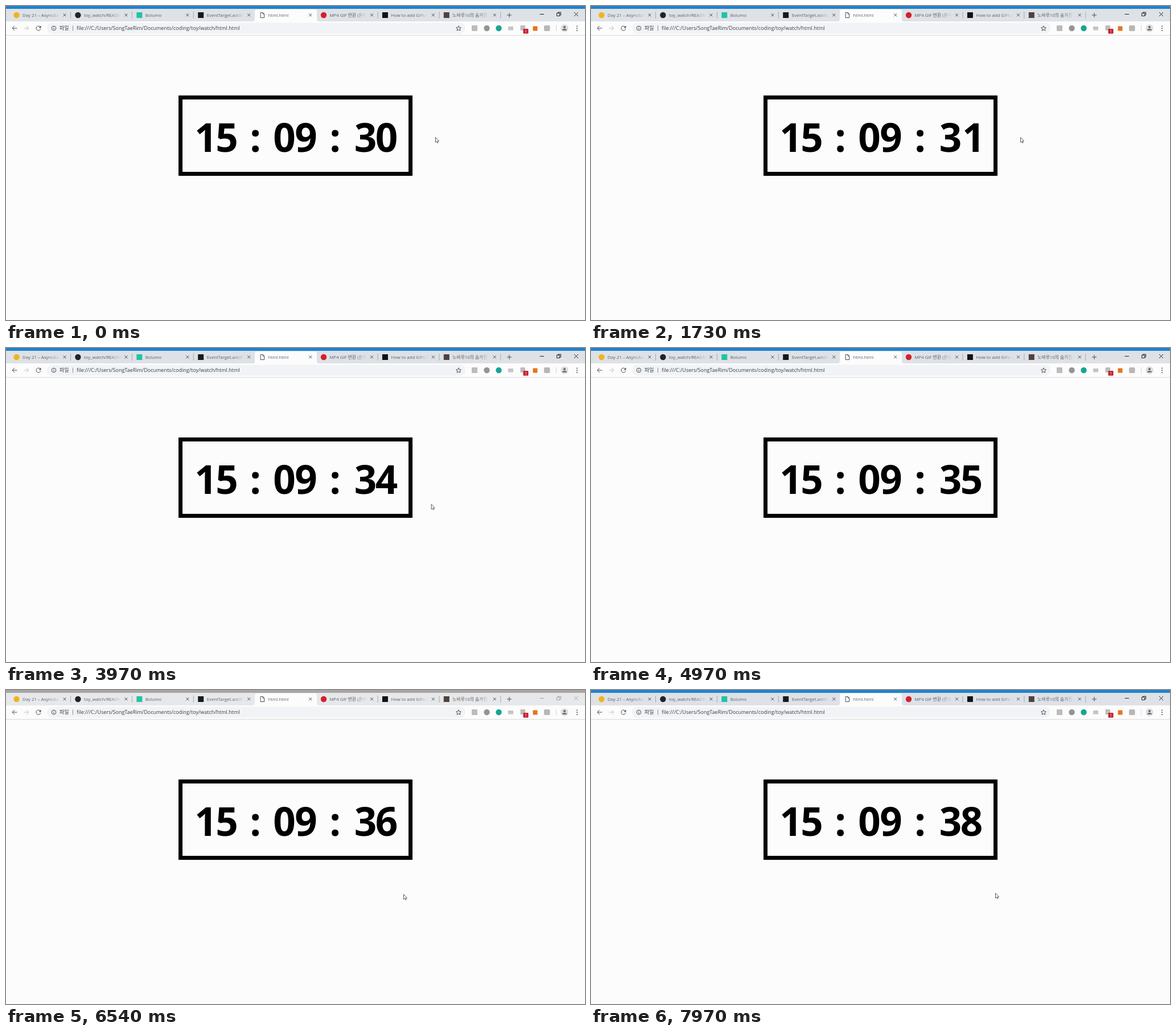
Write an HTML page that moves like this. It is 1017 by 551 pixels and loops after 8 s.

```html
<!DOCTYPE html>
<html lang="ko">
<head>
<meta charset="utf-8">
<title>html.html</title>
<style>
html, body { margin: 0; width: 100%; height: 100%; overflow: hidden; background: #fcfcfc; }
svg { display: block; width: 1017px; height: 551px; }
text { font-family: 'Open Sans', 'Noto Sans CJK KR', 'Noto Sans CJK', 'Noto Sans', sans-serif; white-space: pre; }
.tab text { font-size: 7.8px; }
.url text { font-size: 9px; fill: #3c4043; }
.clock text { font-size: 69px; font-weight: 700; text-anchor: middle; }
.line { fill: none; stroke: #4a4d51; stroke-width: 1; }
.edge, .strip, .buttons { animation: 8s step-end infinite; }
.edge { fill: #2182cb; animation-name: edge; }
.strip { fill: #dee1e6; animation-name: strip; }
.buttons { fill: none; stroke: #222; animation-name: buttons; }
.pointer { animation: move 8s linear infinite; }

/* the window loses focus, then gets it back */
@keyframes edge { 65% { fill: #a9a5a5; } 96.25% { fill: #2182cb; } }
@keyframes strip { 65% { fill: #e7e8ea; } 96.25% { fill: #dee1e6; } }
@keyframes buttons { 65% { stroke: #a3a4a6; } 96.25% { stroke: #222; } }

/* the pointer leaves through the bottom edge and returns */
@keyframes move {
  0%, 47.5% { transform: translate(754px, 230px); animation-timing-function: ease-in; }
  50.9% { transform: translate(738px, 324px); }
  56.5% { transform: translate(700px, 565px); }
  76.2% { transform: translate(665px, 565px); animation-timing-function: ease-out; }
  81%, 91.5% { transform: translate(698px, 358px); animation-timing-function: ease-in-out; }
  94.5%, 100% { transform: translate(710px, 356px); }
}
</style>
</head>
<body>
<svg viewBox="0 0 1017 551">
  <defs>
    <linearGradient id="fade" gradientUnits="userSpaceOnUse" x1="74" x2="95" y1="0" y2="0">
      <stop stop-color="#5b5f64"/>
      <stop offset="1" stop-color="#5b5f64" stop-opacity="0"/>
    </linearGradient>
  </defs>

  <rect width="1017" height="551" fill="#fcfcfc"/>
  <rect class="strip" y="4" width="1017" height="23"/>
  <rect class="edge" width="1017" height="5"/>
  <path d="M433 27q4 0 4-4v-13q0-4 4-4h101q4 0 4 4v13q0 4 4 4z" fill="#fcfcfc"/>
  <g id="tabs"></g>
  <path class="line" d="M880 16h8M884 12v8"/>
  <g class="buttons">
    <path d="M937.500 14.500h7.500M998 11l7 7M1005 11l-7 7"/>
    <path d="M967.500 12.500h5v5h-5zM969.500 12.500v-1.500h5v5h-2"/>
  </g>

  <path d="M0 51.500h1017" stroke="#d9dadc"/>
  <rect x="72" y="29.500" width="735" height="19" rx="9.500" fill="#f1f3f6"/>
  <path class="line" d="M19.500 39h-8.500M15 35l-4 4l4 4"/>
  <path class="line" style="stroke:#bfc1c4" d="M31.500 39h8.500M36 35l4 4l-4 4"/>
  <path class="line" d="M60.300 36.800a4 4 0 1 0 .6 3.200"/>
  <path d="M61.500 34.500v4h-4z" fill="#4a4d51"/>
  <circle class="line" cx="84" cy="39" r="3.800"/>
  <path class="line" d="M84 38.500v2.700M84 36.500v1"/>
  <g class="url">
    <text x="94" y="42.300">파일</text>
    <path d="M117.500 34.500v9" stroke="#8b8e92"/>
    <text x="124" y="42.300">file:///C:/Users/SongTaeRim/Documents/coding/toy/watch/html.html</text>
  </g>
  <path class="line" d="M795 34.800l1.300 2.900l3.100.3l-2.300 2.100l.7 3.100l-2.800-1.600l-2.800 1.600l.7-3.100l-2.300-2.100l3.100-.3z"/>

  <rect x="818" y="34" width="10" height="10" rx="1" fill="#bcbcbc"/>
  <circle cx="844.500" cy="39" r="5.200" fill="#929497"/>
  <circle cx="865.500" cy="39" r="5.200" fill="#18a493"/>
  <rect x="882" y="36" width="9" height="6.500" fill="#c3c5c7"/>
  <rect x="903.500" y="34" width="8.500" height="9" rx="1" fill="#bdbdbd"/>
  <rect x="908.500" y="40" width="9" height="8.500" rx="1" fill="#c5202e"/>
  <text x="913" y="47" font-size="7" fill="#fff" text-anchor="middle">1</text>
  <rect x="925.500" y="35.500" width="8" height="8" fill="#e2761b"/>
  <rect x="945" y="34" width="10.500" height="10" rx="2" fill="#b7b7b7"/>
  <path d="M966.500 34v10" stroke="#d4d5d7"/>
  <circle cx="981" cy="39" r="6.700" fill="#dcdde0"/>
  <circle cx="981" cy="37" r="2" fill="#63666a"/>
  <path d="M977 42.800q0-2.800 4-2.800t4 2.800z" fill="#63666a"/>
  <g fill="#4a4d51">
    <circle cx="1003" cy="35.500" r="1"/><circle cx="1003" cy="39.200" r="1"/><circle cx="1003" cy="42.900" r="1"/>
  </g>

  <rect x="306.500" y="160.500" width="404" height="134" fill="none" stroke="#000" stroke-width="7"/>
  <g class="clock">
    <text y="256" x="351 388 438 489 527 578 631.500">15:09:3</text>
    <text y="256" x="668.500" id="unit">0</text>
  </g>

  <path class="pointer" d="M.5.500v8.700l2-1.700l1.400 2.800l1.300-.6l-1.300-2.700h2.600z" fill="#fff" stroke="#333" stroke-width=".8"/>
</svg>
<script>
const pitch = 107.9;
const tabs = [
  ['Day 21 – Async&amp;Await', 'circle', '#efb51c'],
  ['toy_watch/README.md', 'circle', '#20242a'],
  ['Bolumo', 'square', '#22c3a6'],
  ['EventTarget.addEventListener', 'square', '#15191c'],
  ['html.html', 'page'],
  ['MP4 GIF 변환 (온라인)', 'circle', '#d3202c'],
  ['How to add GIFs to', 'square', '#111'],
  ['노바루10의 숨겨진 기능', 'square', '#50413f']
];

const icons = {
  circle: color => `<circle cx="18.500" cy="16" r="5.200" fill="${color}"/>`,
  square: color => `<rect x="13.500" y="11" width="10" height="10" fill="${color}"/>`,
  page: () => '<path class="line" d="M15.500 11.500h4l2.500 2.500v6.500h-6.500zM19.500 11.500v2.500h2.500"/>'
};

document.getElementById('tabs').innerHTML = tabs.map(([title, icon, color], i) => {
  const bordered = i !== 3 && i !== 4;
  return `<g class="tab" transform="translate(${i * pitch})">
    ${icons[icon](color)}
    <text x="29" y="18.700" fill="url(#fade)">${title}</text>
    <path class="line" d="M100.500 13.300l5 5M105.500 13.300l-5 5"/>
    ${bordered ? '<path d="M113.500 10v12" stroke="#a5a8ad"/>' : ''}
  </g>`;
}).join('');

const unit = document.getElementById('unit');
const loop = 8000, firstTick = 890;
let start;

function draw(now) {
  start ??= now;
  const time = (now - start) % loop;
  const digit = Math.max(0, Math.floor((time - firstTick) / 1000) + 1);
  if (unit.textContent !== String(digit)) {
    unit.textContent = digit;
    unit.setAttribute('x', digit === 1 ? 672 : 668.5);
  }
  requestAnimationFrame(draw);
}
requestAnimationFrame(draw);
</script>
</body>
</html>
```
